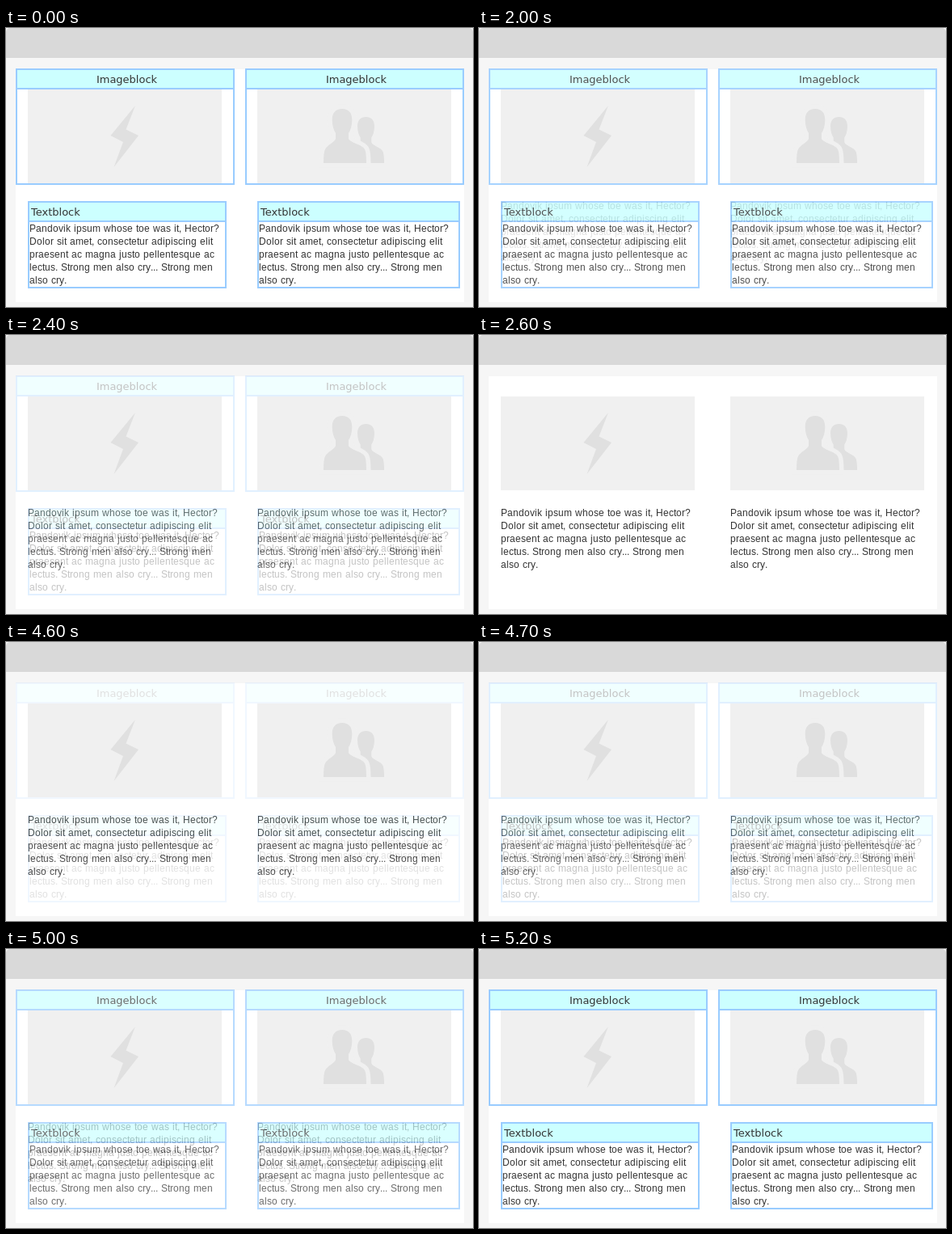
Write an HTML page with a canvas that moves like this. It is 578 px wide and 345 px high and loops after 5.3 s.

```html
<!DOCTYPE html>
<html lang="en">
<head>
<meta charset="utf-8">
<title>Block outlines</title>
<style>
html, body { margin: 0; width: 100%; height: 100%; overflow: hidden; background: #fff; }
canvas { position: absolute; left: 0; top: 0; display: block; }
</style>
</head>
<body>
<canvas id="plain" width="578" height="345"></canvas>
<canvas id="blocks" width="578" height="345"></canvas>
<script>
const LOOP = 5300, STEP = 100, FADES = 7, HIDE = 2000, SHOW = 4600;
const LINES = [
  'Pandovik ipsum whose toe was it, Hector?',
  'Dolor sit amet, consectetur adipiscing elit',
  'praesent ac magna justo pellentesque ac',
  'lectus. Strong men also cry... Strong men',
  'also cry.'
];
const PAPER = '#f0f0f0', ICON = '#e0e0e0', INK = '#333', EDGE = '#9cf';
const plain = document.getElementById('plain');
const blocks = document.getElementById('blocks');

function rect(c, color, x, y, w, h) {
  c.fillStyle = color;
  c.fillRect(x, y, w, h);
}

function bolt(c) {
  const points = [[160, 96], [129.5, 133], [145, 141], [133.5, 172], [164, 133], [148.5, 125.5]];
  c.fillStyle = ICON;
  c.beginPath();
  points.forEach(([x, y]) => c.lineTo(x, y));
  c.closePath();
  c.fill();
}

// Bust outline around x = cx; l and r are the half widths of the shoulders.
function bust(cx, top, s, l, r) {
  const p = new Path2D();
  const half = (dir, w) => {
    const x = v => cx + dir * v * s, y = v => top + v * s;
    p.moveTo(cx, top);
    p.bezierCurveTo(x(8), y(0), x(12.5), y(5), x(12.3), y(14));
    p.quadraticCurveTo(x(12), y(24), x(8), y(30));
    p.lineTo(x(8), y(37));
    p.bezierCurveTo(x(10), y(42), x(w - 5), y(44), x(w - 2), y(50));
    p.quadraticCurveTo(x(w), y(54), x(w), y(67));
    p.lineTo(cx, y(67));
    p.closePath();
  };
  half(-1, l);
  half(1, r);
  return p;
}

function people(c) {
  const front = bust(416, 100, 1, 23, 30);
  c.fillStyle = ICON;
  c.fill(bust(445.5, 110, 0.85, 26.5, 26.5));
  c.strokeStyle = PAPER;
  c.lineWidth = 11;
  c.stroke(front);
  c.fill(front);
}

function page(c) {
  rect(c, '#f6f6f6', 0, 0, 578, 345);
  c.fillStyle = '#d9d9d9';
  c.beginPath();
  c.roundRect(0, 0, 578, 37, [5, 5, 0, 0]);
  c.fill();
  rect(c, '#fff', 12, 51, 555, 288);
  rect(c, PAPER, 27, 76, 240, 116);
  rect(c, PAPER, 311, 76, 240, 116);
  bolt(c);
  people(c);
}

// Screen-hinted text: every glyph advances by whole pixels.
function hinted(c, text, x, y) {
  for (const ch of text) {
    c.fillText(ch, x, y);
    const w = c.measureText(ch).width;
    x += ch === ' ' ? Math.ceil(w) : Math.round(w);
  }
}

function copy(c, x, y) {
  c.font = '12px "Liberation Sans", Arial, sans-serif';
  c.textAlign = 'left';
  c.fillStyle = INK;
  LINES.forEach((line, i) => hinted(c, line, x, y + i * 16));
}

function frame(c, x, y, w, h, label, align) {
  rect(c, EDGE, x, y, w, 26);
  rect(c, '#cff', x + 2, y + 2, w - 4, 22);
  c.strokeStyle = EDGE;
  c.lineWidth = 2;
  c.strokeRect(x + 1, y + 1, w - 2, h - 2);
  c.font = '13px Verdana, "DejaVu Sans", sans-serif';
  c.textAlign = align;
  c.fillStyle = INK;
  c.fillText(label, align === 'center' ? x + w / 2 + 2 : x + 4, y + 18);
}

function drawPlain(c) {
  page(c);
  copy(c, 27, 224);
  copy(c, 311, 224);
}

function drawBlocks(c) {
  page(c);
  frame(c, 12, 50, 271, 144, 'Imageblock', 'center');
  frame(c, 296, 50, 271, 144, 'Imageblock', 'center');
  frame(c, 27, 214, 246, 108, 'Textblock', 'left');
  frame(c, 311, 214, 251, 108, 'Textblock', 'left');
  copy(c, 29, 252);
  copy(c, 313, 252);
}

// Stepped crossfade: 0 before the start, 1 after seven steps.
function fade(t, start) {
  const k = Math.floor((t - start) / STEP) + 1;
  return Math.min(Math.max(k, 0), FADES) / FADES;
}

function tick() {
  const t = performance.now() % LOOP;
  blocks.style.opacity = 1 - fade(t, HIDE) + fade(t, SHOW);
  requestAnimationFrame(tick);
}

drawPlain(plain.getContext('2d', { alpha: false }));
drawBlocks(blocks.getContext('2d', { alpha: false }));
tick();
</script>
</body>
</html>
```
